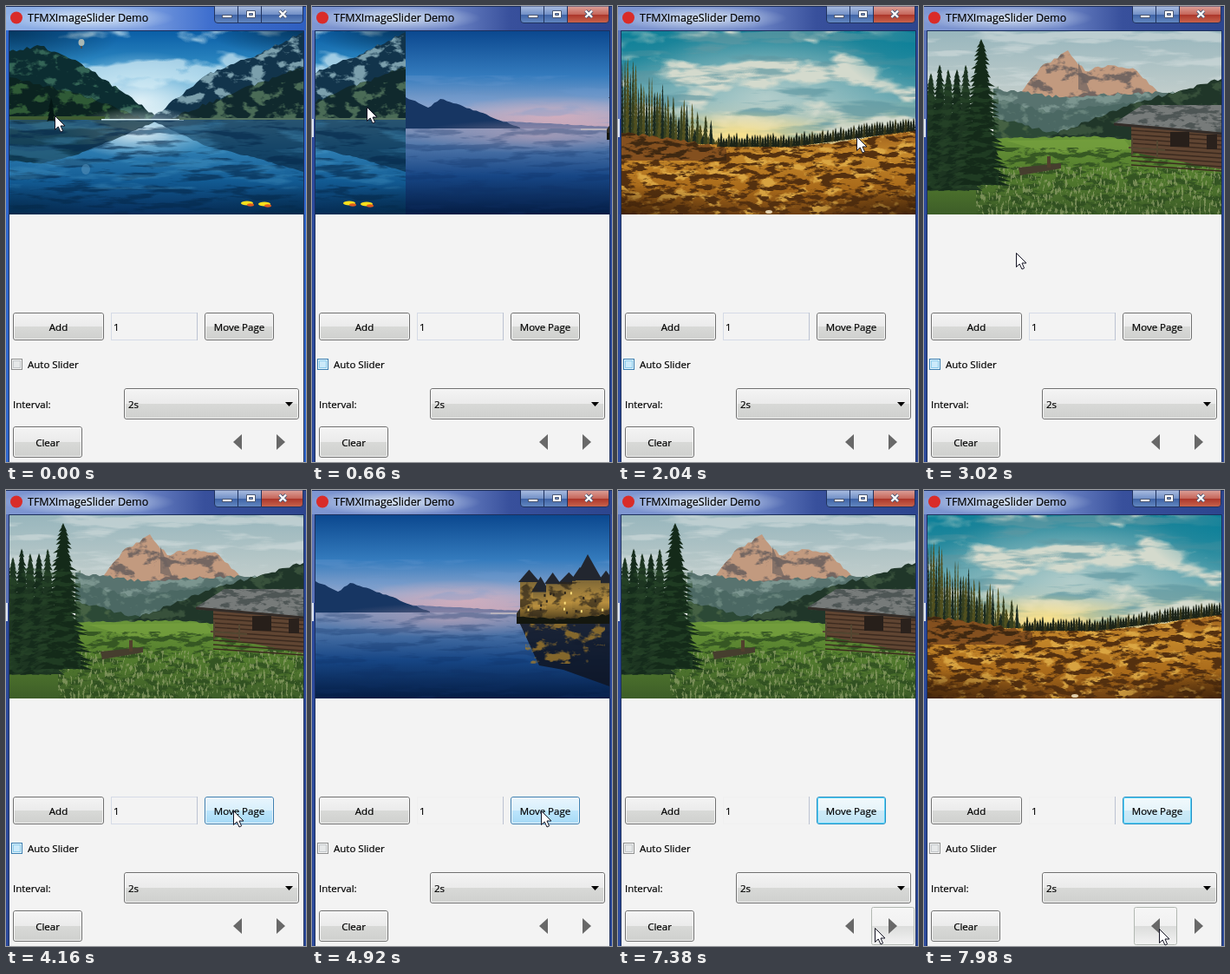
Recreate the animation shown at these times as an HTML page. Size 346 px wide and 525 px high, loop 8000 ms.

```html
<!DOCTYPE html>
<html lang="en">
<head>
<meta charset="utf-8">
<title>Image slider</title>
<style>
html, body { margin: 0; width: 100%; height: 100%; overflow: hidden; background: #f2f2f2; }
svg { display: block; width: 346px; height: 525px; font: 11.5px "Open Sans", "Noto Sans", sans-serif; }
text { fill: #000; stroke: #000; stroke-width: .2px; }
</style>
</head>
<body>
<svg id="stage" viewBox="0 0 346 525"></svg>
<script>
const W = 339, LOOP = 8000;

let seed = 7;
const rnd = (a = 0, b = 1) => {
  seed = (seed * 1664525 + 1013904223) % 4294967296;
  return a + (b - a) * seed / 4294967296;
};
const n1 = v => Math.round(v * 10) / 10;
const clamp = v => Math.max(0, Math.min(1, v));
const mix = (a, b, u) => a + (b - a) * u;
const easeOut = u => 1 - Math.pow(1 - u, 3);
const repeat = (n, draw) => Array.from({ length: n }, (_, i) => draw(i)).join('');

// ---------- drawing helpers ----------
const rect = (x, y, w, h, fill, more = '') =>
  `<rect x="${x}" y="${y}" width="${w}" height="${h}" fill="${fill}" ${more}/>`;
const poly = (pts, fill, more = '') => `<polygon points="${pts}" fill="${fill}" ${more}/>`;
const path = (d, more) => `<path d="${d}" ${more}/>`;
const oval = (x, y, rx, ry, fill, more = '') =>
  `<ellipse cx="${x}" cy="${y}" rx="${rx}" ry="${ry}" fill="${fill}" ${more}/>`;
const label = (x, y, text, more = '') => `<text x="${x}" y="${y}" ${more}>${text}</text>`;
const stops = list => list.map(([o, c, a = 1]) =>
  `<stop offset="${o}" stop-color="${c}" stop-opacity="${a}"/>`).join('');
const fade = (id, list, across) =>
  `<linearGradient id="${id}" x1="0" y1="0" x2="${across ? 1 : 0}" y2="${across ? 0 : 1}">${stops(list)}</linearGradient>`;
// soft round patch of one colour
const glow = (id, color, alpha) =>
  `<radialGradient id="${id}">${stops([[0, color, alpha], [1, color, 0]])}</radialGradient>`;
// keeps only noisy patches of a shape
const noise = (id, fx, fy, gain, bias) => `<filter id="${id}" x="0" y="0" width="1" height="1" color-interpolation-filters="sRGB">
  <feTurbulence type="fractalNoise" baseFrequency="${fx} ${fy}" numOctaves="4" seed="5"/>
  <feColorMatrix values="0 0 0 0 0  0 0 0 0 0  0 0 0 0 0  ${gain} 0 0 0 ${bias}"/>
  <feComposite in="SourceGraphic" operator="in"/></filter>`;
const worn = (id, alpha = 1) => `filter="url(#${id})" opacity="${alpha}"`;

// jagged skyline through a few points, closed down to the base
function ridge(line, base, fill, amp = 2, more = '') {
  const pts = line.split(' ').map(p => p.split(',').map(Number));
  const out = [];
  for (let i = 0; i < pts.length - 1; i++) {
    const [x, y] = pts[i], [u, v] = pts[i + 1];
    const n = Math.max(1, Math.round((u - x) / 4));
    for (let k = 0; k < n; k++)
      out.push([n1(mix(x, u, k / n)), n1(mix(y, v, k / n) + (k ? rnd(-amp, amp) : 0))]);
  }
  const end = pts[pts.length - 1];
  out.push(end, [end[0], base], [pts[0][0], base]);
  return poly(out.join(' '), fill, more);
}
// the same hill with an uneven second tone
const hill = (line, base, fill, tone, grain = 'rock', amp = 2) => {
  const start = seed, body = ridge(line, base, fill, amp);
  seed = start;
  return body + ridge(line, base, tone, amp, worn(grain));
};

function tree(x, top, base, half, fill) {
  const left = [], right = [], n = Math.max(5, Math.round((base - top) / 5));
  for (let i = 1; i <= n; i++) {
    const y = mix(top, base, i / n), w = half * Math.pow(i / n, .7);
    left.push([n1(x - w * rnd(.7, 1.2)), n1(y)], [n1(x - w * rnd(.4, .7)), n1(y - 1)]);
    right.push([n1(x + w * rnd(.7, 1.2)), n1(y)], [n1(x + w * rnd(.4, .7)), n1(y - 1)]);
  }
  return poly([[x, top], ...right, ...left.reverse()].join(' '), fill);
}

// ---------- pictures ----------
function lake() {
  const left = '4,52 40,46 80,62 130,96 176,129', right = '168,129 232,79 290,56 343,30';
  const mirror = 'transform="matrix(1 0 0 -.6 0 209)" opacity=".7"';
  return rect(4, 29, W, 103, 'url(#lakeSky)')
    + oval(155, 110, 105, 58, 'url(#white)')
    + rect(60, 29, 283, 100, '#d5edf6', worn('cloud', .7))
    + oval(4, 29, 130, 45, 'url(#navy)') + oval(343, 29, 110, 30, 'url(#navy)')
    + oval(87, 42, 3.5, 4, '#a9b7b4') + rect(86, 46, 2, 3, '#4c4f50')
    + hill(left, 132, '#0c2d31', '#346556')
    + hill('4,82 70,98 115,112 160,130', 132, '#0b2320', '#2f5a36')
    + hill(right, 132, '#12344b', '#7b9fac')
    + hill('190,129 255,103 343,70', 132, '#10292d', '#4a6b56')
    + rect(4, 131, W, 109, 'url(#lakeWater)')
    + oval(155, 146, 85, 30, 'url(#white)')
    + ridge(left, 130, '#06242f', 1, mirror) + ridge(right, 130, '#0a2d48', 1, mirror)
    + rect(4, 131, W, 109, '#05284a', worn('ripple', .6))
    + rect(4, 131, W, 80, '#4b9bc7', worn('streak', .35))
    + rect(4, 127, 110, 4, '#3f5c32') + rect(110, 130, 95, 1.5, '#d4edf4') + rect(200, 129, 143, 2, '#55725f')
    + tree(52, 106, 133, 5, '#041614') + oval(92, 188, 5, 6, '#538fb9', 'opacity=".6"')
    + oval(343, 245, 160, 40, 'url(#navy)') + oval(4, 245, 120, 40, 'url(#navy)')
    + repeat(2, i => oval(278 + 20 * i, 227 + i, 7, 2.5, '#f8df1c') + oval(282 + 20 * i, 229 + i, 4, 1.7, '#e05a20'));
}

function castle() {
  const tower = i => {
    const x = 240 + 15 * i, w = rnd(15, 23), y = rnd(103, 119);
    return rect(x, n1(y), n1(w), n1(148 - y), 'url(#stone)')
      + poly([[x - 2, y + 1], [x + w / 2, y - rnd(10, 18)], [x + w + 2, y + 1]].map(p => p.map(n1)).join(' '), '#22262f');
  };
  return rect(4, 29, W, 113, 'url(#duskSky)')
    + oval(175, 127, 130, 24, 'url(#pink)')
    + rect(4, 80, W, 55, '#6f9bd0', worn('streak', .3))
    + ridge('108,132 238,139', 142, '#65739e', .4)
    + ridge('4,105 30,117 44,107 78,118 136,140', 142, '#173663', 1)
    + rect(4, 141, W, 99, 'url(#duskWater)')
    + oval(160, 150, 150, 20, 'url(#pink)', 'opacity=".6"')
    + rect(4, 141, W, 99, '#0f2f63', worn('ripple', .3))
    + rect(206, 141, 34, 2, '#b7b2bc')
    + poly('238,150 343,150 343,226 290,207 262,202', '#101522', 'opacity=".85"')
    + rect(246, 152, 92, 48, '#a07a2c', worn('rock', .8))
    + ridge('236,142 250,124 343,115', 151, '#302c23', 1)
    + repeat(7, tower)
    + rect(304, 103, 29, 46, 'url(#stone)') + poly('302,104 318,74 335,104', '#22262f')
    + rect(240, 106, 103, 44, '#2b241a', worn('rock', .7))
    + repeat(18, i => rect(n1(rnd(246, 338)), n1(rnd(114, 140)), 2, 3, i % 3 ? '#2c241a' : '#ffdf7b'))
    + ridge('236,146 290,149 343,143', 154, '#14170f', 1.5);
}

function field() {
  const ground = '4,146 115,157 180,162 250,158 343,142';
  const wood = i => {
    const x = 5 + i * 3.1, top = mix(62, 146, Math.pow(i / 36, .9)) + rnd(-13, 16);
    return tree(x, top, 160, rnd(2, 4.5), ['#1b2a20', '#37401f', '#51501f'][i % 3]);
  };
  const farTree = i => {
    const x = 116 + i * 3, y = 160 - Math.max(0, x - 200) * .13;
    return tree(x, y - rnd(8, 15), y + 3, 3, i % 4 ? '#1c2418' : '#37371a');
  };
  return rect(4, 29, W, 140, 'url(#fieldSky)')
    + oval(170, 105, 175, 80, 'url(#veil)')
    + rect(4, 29, W, 125, '#d4dacd', worn('cloud'))
    + rect(4, 29, W, 125, '#5f98a2', worn('streak', .7))
    + oval(4, 29, 95, 55, 'url(#teal)') + oval(343, 40, 90, 60, 'url(#teal)')
    + oval(140, 148, 110, 28, 'url(#sun)')
    + ridge(ground, 240, 'url(#grass)', 1)
    + ridge(ground, 240, '#e0ad48', 1, worn('rock', .85))
    + ridge(ground, 240, '#54300f', 1, worn('turf'))
    + repeat(36, wood) + repeat(76, farTree)
    + hill('4,146 60,152 125,164', 178, '#84501f', '#3f2811', 'turf')
    + oval(4, 240, 140, 35, 'url(#earth)') + oval(343, 240, 130, 35, 'url(#earth)')
    + oval(174, 237, 4, 2, '#e2cfab');
}

function alps() {
  const peak = '108,103 134,71 166,51 186,75 212,68 245,74 271,101';
  return rect(4, 29, W, 90, 'url(#alpSky)')
    + rect(4, 29, W, 65, '#d3dddd', worn('streak', .6))
    + hill(peak, 116, '#c29a7f', '#746661')
    + poly('178,65 192,100 178,96', '#6d625f', 'opacity=".7"')
    + hill('80,95 160,105 271,99 343,102', 155, '#58736f', '#7b958f')
    + hill('80,107 145,122 230,111 280,117', 155, '#4b6863', '#66827a')
    + hill('80,128 145,145 185,149', 165, '#2c4936', '#456143')
    + hill('145,150 230,116 343,84', 168, '#203629', '#38513b')
    + ridge('4,154 200,150 343,165', 240, 'url(#meadow)', 1)
    + poly('95,155 230,153 240,165 145,170', '#78a340', 'opacity=".65"')
    + rect(60, 163, 283, 77, '#2d4c20', worn('turf', .8))
    + rect(60, 185, 283, 55, '#90a06a', worn('blades', .7))
    + poly('239,134 343,144 343,188 239,168', '#604532')
    + repeat(9, i => path(`M239 ${143 + 5 * i}L343 ${150 + 5 * i}`, 'stroke="#3b2a1f" stroke-width="1.3"'))
    + rect(284, 145, 22, 17, '#271f1a') + rect(326, 148, 12, 17, '#2a211c')
    + poly('219,135 252,114 343,114 343,146', '#777b7a')
    + poly('219,135 252,114 343,114 343,146', '#454d4d', worn('turf', .8))
    + path('M219 136L343 147', 'stroke="#332c28" stroke-width="3"')
    + poly('109,186 158,181 158,187 111,195', '#463e2e') + rect(142, 173, 4, 13, '#51402d')
    + path('M236 163L278 166M240 151V171M269 155V174', 'stroke="#534631" stroke-width="2"')
    + repeat(5, i => tree(8 + 10 * i, 62 + rnd(0, 22), 213, 19, i % 2 ? '#152b1b' : '#1d3521'))
    + tree(66, 38, 207, 31, '#142a19')
    + rect(4, 90, 82, 120, '#2b4c2c', worn('turf', .5));
}

// ---------- window parts ----------
const button = (id, x, y, w, h) =>
  `<g id="${id}">` + rect(x + .5, y + .5, w - 1, h - 1, 'url(#face)', 'rx="2.5" stroke="#707070"')
  + rect(x + 1.5, y + 1.5, w - 3, h - 3, 'none', 'rx="1.5" stroke="#fafafa" stroke-opacity=".85"') + '</g>';
const flat = (id, x) => rect(x + .5, 480.5, 49, 43, 'url(#hoverFace)', `id="${id}" rx="2" stroke="#b2b8b2"`);
// glossy surface with a hard break at half height
const gloss = (id, a, b, c, d) => fade(id, [[0, a], [.49, b], [.51, c], [1, d]]);

const defs = `<defs><clipPath id="view">${rect(4, 29, W, 211, '#000')}</clipPath>`
  + noise('cloud', .014, .032, 7, -3.4)
  + noise('streak', .012, .07, 7, -3.5)
  + noise('rock', .05, .08, 8, -4.2)
  + noise('ripple', .02, .12, 7, -3.5)
  + noise('turf', .06, .16, 8, -3.8)
  + noise('blades', .35, .12, 9, -5)
  + fade('lakeSky', [[0, '#0a5ea6'], [.5, '#3a98cc'], [1, '#c4e4ee']])
  + fade('lakeWater', [[0, '#6fb2d4'], [.3, '#2f7fb3'], [.65, '#125a92'], [1, '#062c58']])
  + fade('duskSky', [[0, '#0b488f'], [.45, '#347bbd'], [.8, '#94a8ce'], [1, '#b9a2b8']])
  + fade('duskWater', [[0, '#8293b9'], [.2, '#4f76aa'], [.55, '#174685'], [1, '#041c43']])
  + fade('stone', [[0, '#7c6636'], [.55, '#b9903f'], [1, '#54431f']])
  + fade('fieldSky', [[0, '#147f96'], [.55, '#5fa3ae'], [.85, '#d2cba0'], [1, '#e0b04c']])
  + fade('grass', [[0, '#9a5c1c'], [.3, '#c4872a'], [.7, '#a8691a'], [1, '#6e4012']])
  + fade('alpSky', [[0, '#98b6bd'], [1, '#cbd3cf']])
  + fade('meadow', [[0, '#6a9639'], [.4, '#57812f'], [1, '#3d5d28']])
  + glow('white', '#eef8fb', .85) + glow('navy', '#042c4a', .75) + glow('pink', '#e0b0ba', .75)
  + glow('veil', '#cfdbd4', .75) + glow('teal', '#0a8099', .8) + glow('sun', '#fbe28a', .95)
  + glow('earth', '#3a1f08', .75)
  + fade('titleBright', [[0, '#8fb0e6'], [.45, '#7d9fe0'], [.68, '#3f6fce'], [1, '#2f5fc0']], 1)
  + fade('titleDim', [[0, '#7f97d2'], [.45, '#6f87c8'], [.66, '#38509c'], [1, '#2c458e']], 1)
  + gloss('caption', '#acbfe2', '#7391c7', '#3e62a5', '#6489c2')
  + gloss('red', '#dda29a', '#c6675b', '#ab3529', '#c9654e')
  + gloss('face', '#f4f4f4', '#ebebeb', '#d8d9d7', '#cfd0ce')
  + gloss('hoverFace', '#f6f6f6', '#f1f1f1', '#dcdddc', '#f3f3f3')
  + gloss('blueFace', '#e9f6fd', '#d8effc', '#bce5fc', '#a6d9f5')
  + gloss('focusFace', '#f2f9fc', '#e6f4fa', '#cdeaf7', '#c0e4f5')
  + '</defs>';

const closeX = 'M315.5 5.5L323 13M323 5.5L315.5 13';
const frame = `<g id="bright">${rect(0, 0, 346, 525, '#3068cf')}${rect(0, 0, 346, 28, 'url(#titleBright)')}</g>
  <g id="dim">${rect(0, 0, 346, 525, '#2c4a9c')}${rect(0, 28, 3, 102, '#5a72b8')}${rect(0, 130, 2, 21, '#dce4f2')}
  ${rect(0, 0, 346, 28, 'url(#titleDim)')}</g>`
  + oval(95, 14, 100, 15, 'url(#white)')
  + path('M0 .5H346M3.5 525V28.5H343.5V525', 'fill="none" stroke="#1c2f5c"')
  + rect(4, 29, W, 496, '#f3f3f3')
  + oval(12, 13.5, 7, 7, '#d92c29')
  + label(25, 18, 'TFMXImageSlider Demo', 'font-size="12.5"')
  + path('M240.5 0V16Q240.5 19.5 244 19.5H267.5V0Z M267.5 0V19.5H294.5V0Z', 'fill="url(#caption)" stroke="#20335f"')
  + path('M294.5 0V19.5H339Q342.5 19.5 342.5 16V0Z', 'id="close" stroke="#20335f"')
  + rect(249.5, 10.5, 11, 3, '#fff', 'stroke="#4b5874"')
  + path('M277.5 5.5H287.5V13.5H277.5ZM280.5 8.5H284.5V10.5H280.5Z', 'fill="#fff" fill-rule="evenodd" stroke="#4b5874"')
  + path(closeX, 'stroke="#4b5874" stroke-width="4"') + path(closeX, 'stroke="#fff" stroke-width="2.4"');

const mid = 'text-anchor="middle"';
const controls = button('add', 8, 353, 105, 32) + label(60.5, 374, 'Add', mid)
  + rect(121.5, 353.5, 99, 31, '#f3f3f3', 'id="edit"')
  + path('M220.5 353V385', 'stroke="#bcc3d2"')
  + label(124, 374, '1')
  + button('move', 229, 353, 80, 32) + label(269, 374, 'Move Page', mid)
  + rect(6.5, 406.5, 12, 12, '#f4f4f4', 'id="box"')
  + rect(8.5, 408.5, 8, 8, '#e6e8e9', 'id="boxIn"')
  + label(25, 417, 'Auto Slider') + label(8, 463, 'Interval:')
  + button('combo', 136, 440, 202, 36) + label(141, 463, '2s') + poly('322,456 331,456 326.5,461', '#000')
  + button('clear', 8, 484, 80, 36) + label(48, 507, 'Clear', mid)
  + flat('prev', 242) + flat('next', 292)
  + poly('262,502 272,493 272,511', '#686868') + poly('322,502 312,493 312,511', '#686868');

const $ = id => document.getElementById(id);
$('stage').innerHTML = defs + frame + '<g clip-path="url(#view)">'
  + [lake, castle, field, alps].map((draw, i) => `<g id="page${i}"><g clip-path="url(#view)">${draw()}</g></g>`).join('')
  + '</g>' + controls
  + path('M-.5 .5V16.5L3.2 13L6 19L8.6 17.8L6 12H11Z', 'id="cursor" fill="#fff" stroke="#151525"');

// ---------- motion ----------
// Each act redraws in a few even steps. A drag grips at the right, pulls to
// "pull" and lets go; a click slides the pages within the "slide" window.
const acts = [
  { start: 150, end: 1080, steps: 8, page: 1, pull: [64, 116], to: [280, 140] },
  { start: 1230, end: 2040, steps: 7, page: 2, pull: [64, 138], to: [276, 150] },
  { start: 2290, end: 3290, steps: 8, page: 3, pull: [100, 150], to: [110, 340] },
  { start: 3440, end: 4460, steps: 8, page: 3, to: [265, 369] },
  { start: 4770, end: 5070, steps: 3, page: 1, slide: [0, .66], to: [265, 369] },
  { start: 5530, end: 6340, steps: 7, page: 2, slide: [.6, 1], to: [320, 503] },
  { start: 6770, end: 6920, steps: 2, page: 3, slide: [0, 1], to: [320, 503] },
  { start: 7380, end: 7980, steps: 5, page: 2, slide: [.6, 1], to: [272, 505] },
];
const GRIP = .3, FREE = .625, SETTLED = .75, PULLED = 235 / W;
const blend = (a, b, u) => a.map((v, i) => mix(v, b[i], u));

function pose(time) {
  let page = 0, spot = [57, 126];
  for (const act of acts) {
    if (time < act.start) break;
    const gap = (act.end - act.start) / (act.steps - 1);
    const u = clamp((Math.floor((time - act.start) / gap + .2) + 1) / act.steps);
    let moved = 0;
    if (act.pull) {
      const grip = [298, act.pull[1]];
      moved = u <= FREE ? PULLED * clamp((u - GRIP) / (FREE - GRIP))
        : mix(PULLED, 1, clamp((u - FREE) / (SETTLED - FREE)));
      spot = u < GRIP ? blend(spot, grip, u / GRIP)
        : u <= FREE ? blend(grip, act.pull, (u - GRIP) / (FREE - GRIP))
        : blend(act.pull, act.to, easeOut((u - FREE) / (1 - FREE)));
    } else {
      if (act.slide) moved = clamp((u - act.slide[0]) / (act.slide[1] - act.slide[0]));
      spot = blend(spot, act.to, easeOut(u));
    }
    page = mix(page, act.page, moved);
  }
  return { page, x: Math.round(spot[0]), y: Math.round(spot[1]) };
}

const show = (id, on) => $(id).setAttribute('visibility', on ? 'visible' : 'hidden');
const paint = (el, fill, stroke) => {
  el.setAttribute('fill', fill);
  el.setAttribute('stroke', stroke);
};

let drawn = '';
function render(time) {
  const { page, x, y } = pose(time);
  const early = time < acts[0].start, clicked = time >= acts[4].start;
  const key = [page, x, y, early, clicked].join();
  if (key === drawn) return;
  drawn = key;

  for (let i = 0; i < 4; i++) {
    $('page' + i).setAttribute('transform', `translate(${Math.round((i - page) * W)} 0)`);
    show('page' + i, Math.abs(i - page) < 1);
  }
  $('cursor').setAttribute('transform', `translate(${x} ${y})`);

  show('bright', early);
  show('dim', !early);
  paint($('close'), early ? 'url(#caption)' : 'url(#red)', '#20335f');
  const hot = !early && !clicked;
  paint($('box'), hot ? '#e3f4fc' : '#f4f4f4', hot ? '#3c7fb1' : '#8e8f8f');
  paint($('boxIn'), hot ? '#cbeafa' : '#e6e8e9', hot ? '#8cccec' : '#c4c8cb');
  paint($('edit'), '#f3f3f3', clicked ? '#f0f0f0' : '#d5dbe6');

  const over = (l, t, r, b) => x >= l && x < r && y >= t && y < b;
  const hover = over(229, 353, 309, 385), focus = clicked && !hover;
  const [rim, inner] = $('move').children;
  paint(rim, hover ? 'url(#blueFace)' : focus ? 'url(#focusFace)' : 'url(#face)',
    focus ? '#2a8fc4' : hover ? '#3c7fb1' : '#707070');
  paint(inner, 'none', focus ? '#3fd0fa' : '#fafafa');
  show('prev', over(242, 480, 292, 524));
  show('next', over(292, 480, 342, 524));
}

function loop(now) {
  render(now % LOOP);
  requestAnimationFrame(loop);
}
render(0);
requestAnimationFrame(loop);
</script>
</body>
</html>
```
